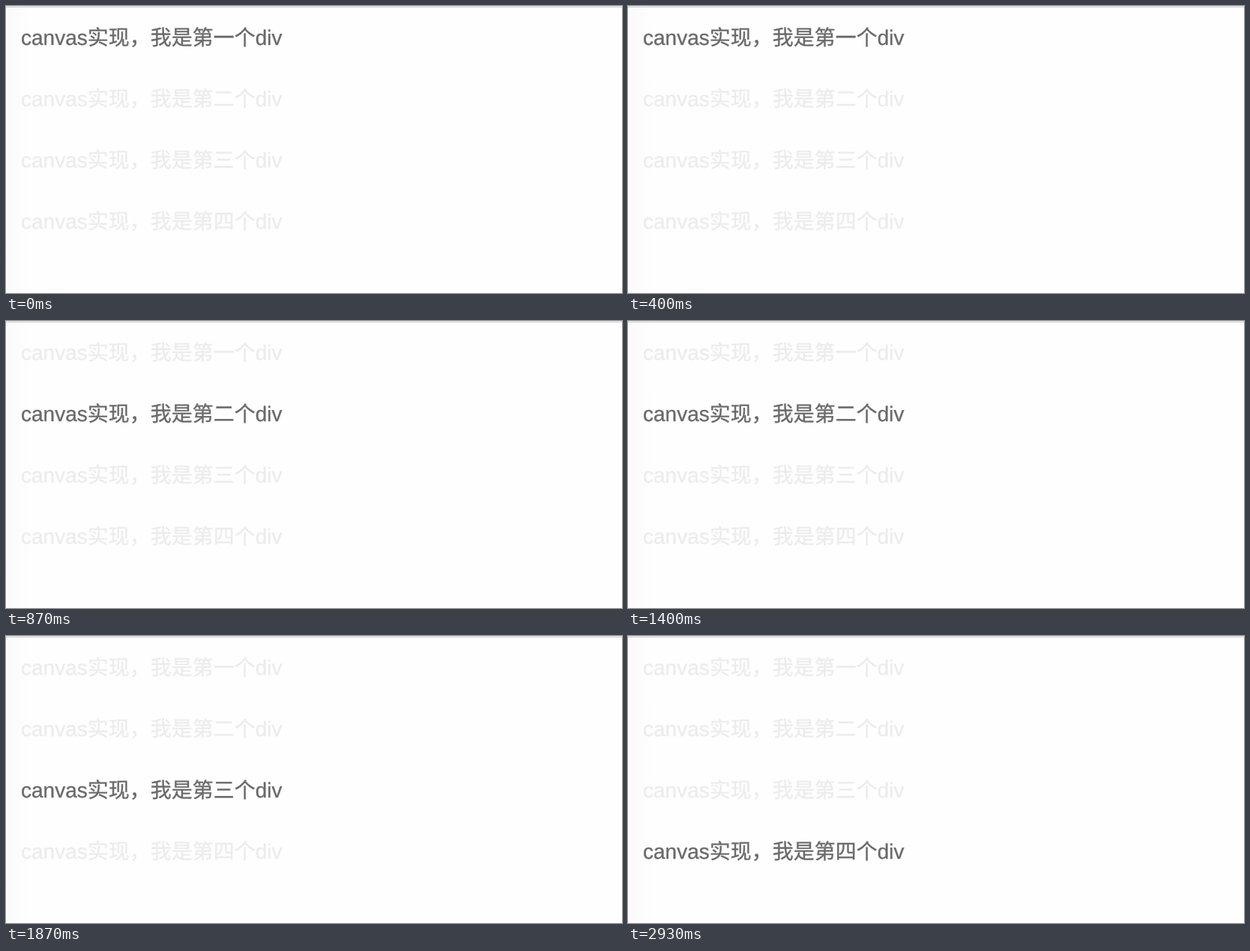
These frames come from a looping animation (822 px wide and 384 px high, 3070 ms). An HTML page with a canvas:

```html
<!DOCTYPE html>
<html lang="zh-CN">
<head>
<meta charset="utf-8">
<title>canvas</title>
<style>
  html, body { margin: 0; width: 100%; height: 100%; overflow: hidden; background: #fefefe; }
  canvas { display: block; }
</style>
</head>
<body>
<canvas id="stage" width="822" height="384"></canvas>
<script>
const ctx = document.getElementById('stage').getContext('2d');
const LOOP = 3070;
const SWITCHES = [870, 1870, 2870];
const ROWS = ['一', '二', '三', '四'].map(n => `canvas实现，我是第${n}个div`);

function drawBackground() {
  ctx.fillStyle = '#fefefe';
  ctx.fillRect(0, 0, 822, 384);

  const shade = ctx.createLinearGradient(0, 0, 34, 0);
  shade.addColorStop(0, '#fafafa');
  shade.addColorStop(1, '#fefefe');
  ctx.fillStyle = shade;
  ctx.fillRect(0, 0, 34, 384);

  ctx.fillStyle = '#ebebeb';
  ctx.fillRect(0, 0, 822, 1);
  ctx.fillStyle = '#cdcdcd';
  ctx.fillRect(0, 1, 822, 1);
}

function drawRow(text, i, active) {
  const y = 52 + i * 82;
  ctx.fillStyle = ctx.strokeStyle = active ? '#6a6a6a' : '#ececec';
  ctx.fillText(text, 20, y);
  ctx.strokeText(text, 20, y);
}

function draw(t) {
  const current = SWITCHES.filter(s => t >= s).length;
  drawBackground();
  ctx.font = '28px "Liberation Sans", "Noto Sans CJK SC", "Noto Sans CJK", sans-serif';
  ctx.textRendering = 'geometricPrecision';
  ctx.textBaseline = 'alphabetic';
  ctx.lineWidth = 0.35;
  ctx.lineJoin = 'round';
  ROWS.forEach((text, i) => drawRow(text, i, i === current));
}

const start = performance.now();
function tick() {
  draw((performance.now() - start) % LOOP);
  requestAnimationFrame(tick);
}
tick();
</script>
</body>
</html>
```
